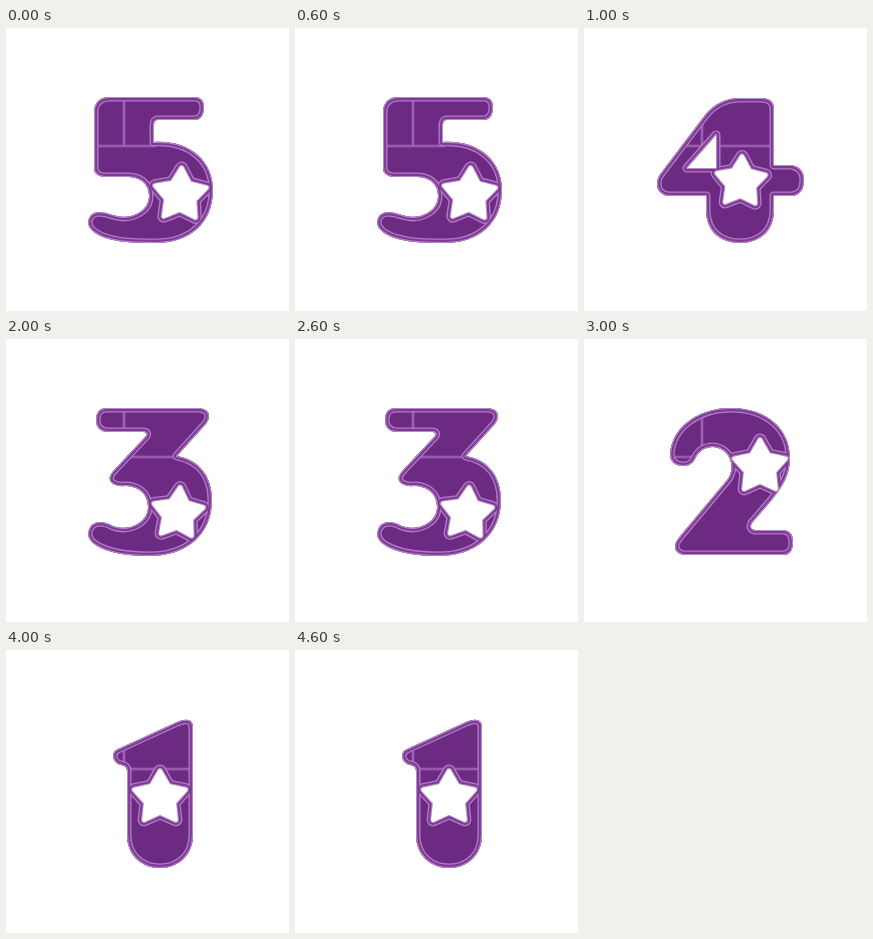
Write an HTML page with a canvas that moves like this. It is 283 by 283 pixels and loops after 5000 ms.

```html
<!DOCTYPE html>
<html lang="en">
<head>
<meta charset="utf-8">
<title>Countdown</title>
<style>
  html, body { margin: 0; width: 100%; height: 100%; overflow: hidden; background: #fff; }
  canvas { display: block; }
</style>
</head>
<body>
<canvas id="stage" width="283" height="283"></canvas>
<script>
const ctx = document.getElementById('stage').getContext('2d');
const BODY = '#6c2a82', BEVEL = '#7d3a94', GLOW = '#b47bc6', EDGE = '#b48ac3';
const STEP = 1000;

// star: centre x, centre y, radius, tilt; seams: light joints between the panels
const digits = [
  { d: 'M88 82Q90 69 104 69H190Q198 70 198 79Q198 92 188 92H152Q148 92 148 97V114C184 112 207 133 207 162C207 195 184 215 150 215C125 215 102 214 89 205Q82 200 82 194Q83 185 92 184Q99 184 107 187C125 193 143 183 143 168C143 154 132 149 121 149H98Q88 148 88 140Z',
    star: [174.5, 167, 29.5, 0.04], seams: 'M88 118H150M118 69V118' },
  { d: 'M156 70H177Q190 70 190 81V137H207Q220 139 220 152Q220 166 209 168H190V182C190 203 176 215 156 215C136 215 122 203 122 182V168H84Q73 166 73 156Q73 150 77 145L121 87Q135 70 156 70ZM132 107V140H103Z',
    star: [157, 154, 28, 0.04], seams: 'M98 118H190M118 92V118' },
  { d: 'M90 81Q90 69 101 69H193Q203 70 203 77Q203 81 200 85L171 117C194 121 206 138 206 161C206 196 180 217 144 217C122 217 103 214 91 207Q82 202 82 194Q84 183 94 183Q100 183 107 187C124 193 142 183 142 168C142 153 130 147 119 147Q108 148 104 142Q102 137 109 130L140 97Q142 93 137 93H101Q90 92 90 81Z',
    star: [172, 174.5, 28.5, 0.08], seams: 'M120 118H174M118 69V93' },
  { d: 'M86 115C88 88 114 69 147 69C183 69 206 90 206 119C206 136 199 147 187 162L168 184Q165 190 171 191H200Q209 192 209 203Q209 216 199 216H100Q91 215 91 207Q91 203 97 196L143 141C153 129 146 109 129 108C120 108 114 113 111 120Q107 128 98 127Q86 126 86 115Z',
    star: [176, 128, 29.5, 0], seams: 'M86 118H110M118 75V110' },
  { d: 'M171 72Q178 69 182 70Q187 71 187 77V185C187 205 173 218 154 218C135 218 121 205 121 185V121Q121 116 115 115Q108 114 107 106Q107 101 112 99Z',
    star: [154, 148, 29.5, 0], seams: 'M121 119H187M118 96V115' }
].map(g => ({ body: new Path2D(g.d), star: starPath(...g.star), seams: new Path2D(g.seams) }));

function starPath(x, y, r, tilt) {
  const p = new Path2D();
  for (let i = 0; i < 10; i++) {
    const a = (i / 5 - 0.5) * Math.PI + tilt;
    const k = i % 2 ? r * 0.5 : r - 2.5;
    p.lineTo(x + k * Math.cos(a), y + k * Math.sin(a));
  }
  p.closePath();
  return p;
}

function line(path, color, width) {
  ctx.strokeStyle = color;
  ctx.lineWidth = width;
  ctx.stroke(path);
}

function drawDigit({ body, star, seams }) {
  ctx.fillStyle = '#fff';
  ctx.fillRect(0, 0, 283, 283);
  ctx.lineJoin = 'round';

  ctx.save();
  ctx.clip(body, 'evenodd');
  ctx.fillStyle = BODY;
  ctx.fill(body, 'evenodd');
  line(seams, BEVEL, 4);
  line(seams, GLOW, 1.2);

  // Each wider band is painted first so only its rim remains
  const bands = [[GLOW, 9], [BEVEL, 6.4], [EDGE, 2.2]];
  for (const [color, width] of bands) {
    line(body, color, width);
    line(star, color, width + 4);
  }
  ctx.restore();

  ctx.fillStyle = '#fff';
  ctx.fill(star);
  line(star, '#fff', 4);
}

function frame(now) {
  drawDigit(digits[Math.floor(now / STEP) % digits.length]);
  requestAnimationFrame(frame);
}
frame(0);
</script>
</body>
</html>
```
